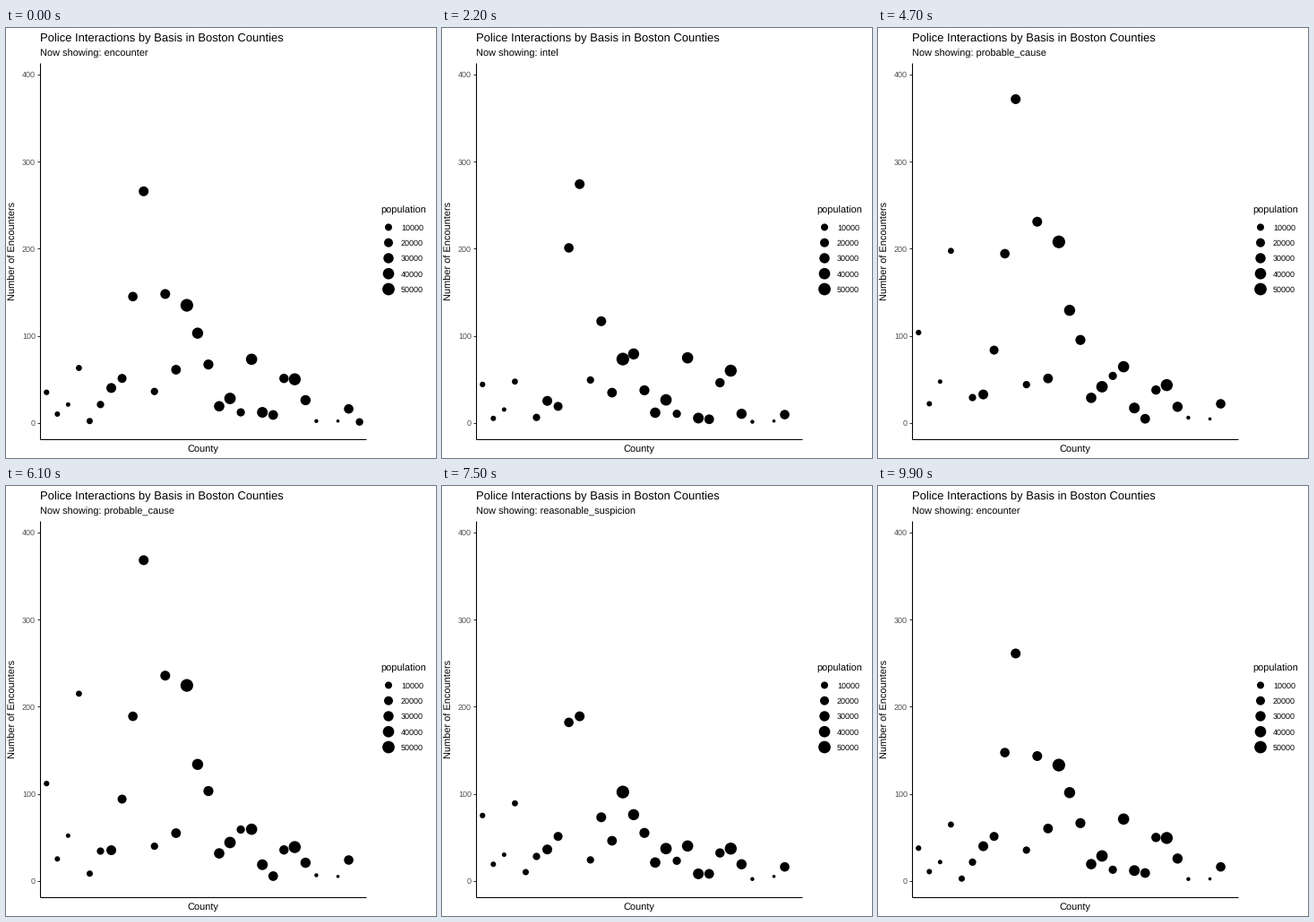
A matplotlib script for the animation above (10 s loop, 480 by 480 pixels).

```python
import matplotlib.pyplot as plt
import numpy as np
from matplotlib.animation import FuncAnimation
from matplotlib.patches import Circle

plt.rcParams.update({
    "font.family": "Liberation Sans",
    "text.hinting": "none",
    "text.hinting_factor": 1,
    "toolbar": "None",
})

SIZE = 480
FRAMES = 100
LEFT, RIGHT, TOP, BOTTOM = 38, 402, 39, 459
NA = np.nan

# One count per county; NA where a county has no record
COUNTS = {
    "encounter": [35, 10, 21, 63, 2, 21, 40, 51, 145, 266, 36, 148, 61, 135, 103,
                  67, 19, 28, 12, 73, 12, 9, 51, 50, 26, 2, NA, 2, 16, 1],
    "intel": [46, 4, 14, 44, NA, 3, 22, 12, 213, 276, 52, 110, 29, 60, 74,
              31, 10, 26, 10, 75, 4, 3, 45, 62, 7, 1, NA, 2, 8, NA],
    "probable_cause": [117, 26, 55, 233, 8, 35, 35, 100, 190, 394, 42, 259, 56, 242, 142,
                       110, 33, 45, 64, 62, 20, 5, 36, 39, 21, 7, NA, 5, 25, NA],
    "reasonable_suspicion": [75, 19, 30, 89, 10, 28, 36, 51, 182, 189, 24, 73, 46, 102, 76,
                             55, 21, 37, 23, 40, 8, 8, 32, 37, 19, 2, NA, 5, 16, NA],
}
RADII = [3.1, 3.0, 2.5, 3.4, 3.5, 4.1, 5.5, 5.0, 5.3, 5.5, 4.1, 5.5, 5.4, 7.1, 6.2,
         5.6, 5.8, 6.4, 4.6, 6.3, 6.0, 5.4, 5.2, 6.7, 5.7, 2.2, 1.8, 1.8, 5.3, 4.2]

STATES = list(COUNTS)
VALUES = np.array([COUNTS[s] for s in STATES])
# Last resting frame of each state, first resting frame of the next
MOVES = [(8, 25), (34, 50), (59, 75), (84, 100)]


def x_pos(i):
    return 45.25 + 12.047 * i


def y_pos(count):
    return 440.7 - 0.9715 * count


def legend_radius(pop, low=500, high=55000):
    size = 1 + 5 * np.sqrt((pop - low) / (high - low))
    return 1.067 * size + 0.709


fig = plt.figure(figsize=(SIZE / 72, SIZE / 72), dpi=72, facecolor="white")
ax = fig.add_axes([0, 0, 1, 1])
ax.set_xlim(0, SIZE)
ax.set_ylim(SIZE, 0)
ax.axis("off")


def label(x, y, text, size=11, **style):
    return ax.text(x, y, text, size=size, **{"va": "baseline", "color": "black", **style})


def line(xs, ys, color="black"):
    ax.plot(xs, ys, color=color, lw=1.07, solid_capstyle="butt")


def dot(x, y, r):
    return ax.add_patch(Circle((x, y), r, fc="black", ec="none"))


label(LEFT, 15, "Police Interactions by Basis in Boston Counties", 13.2)
subtitle = label(LEFT, 32, "")
label(220, 473, "County", ha="center")
label(13, 249, "Number of Encounters", rotation=90, ha="right", va="center")

for count in range(0, 401, 100):
    y = y_pos(count)
    line([LEFT - 2.75, LEFT], [y, y], "#333333")
    label(33, y + 3.2, str(count), 8.8, ha="right", color="#4D4D4D")
line([LEFT + 0.3] * 2, [TOP, BOTTOM])
line([LEFT, RIGHT], [BOTTOM - 0.2] * 2)

label(418, 207, "population")
for k in range(5):
    pop = 10000 * (k + 1)
    y = 222.4 + 17.28 * k
    dot(427, y, legend_radius(pop))
    label(441, y + 3.2, str(pop), 8.8)

dots = [dot(x_pos(i), 0, r) for i, r in enumerate(RADII)]


def state_at(frame):
    """Return the nearest state's name and every county's count."""
    for k, (start, end) in enumerate(MOVES):
        after = (k + 1) % len(STATES)
        if frame <= start:
            return STATES[k], VALUES[k]
        if frame < end:
            t = (frame - start) / (end - start)
            name = STATES[after if t >= 0.5 else k]
            return name, VALUES[k] + t * (VALUES[after] - VALUES[k])
    return STATES[0], VALUES[0]


def draw(frame):
    name, counts = state_at(frame)
    subtitle.set_text(f"Now showing: {name}")
    for i, (point, count) in enumerate(zip(dots, counts)):
        shown = not np.isnan(count)
        point.set_visible(shown)
        if shown:
            point.center = x_pos(i), y_pos(count)
    return [subtitle, *dots]


anim = FuncAnimation(fig, draw, frames=FRAMES, interval=100, repeat=True, repeat_delay=0)
plt.show()
```
